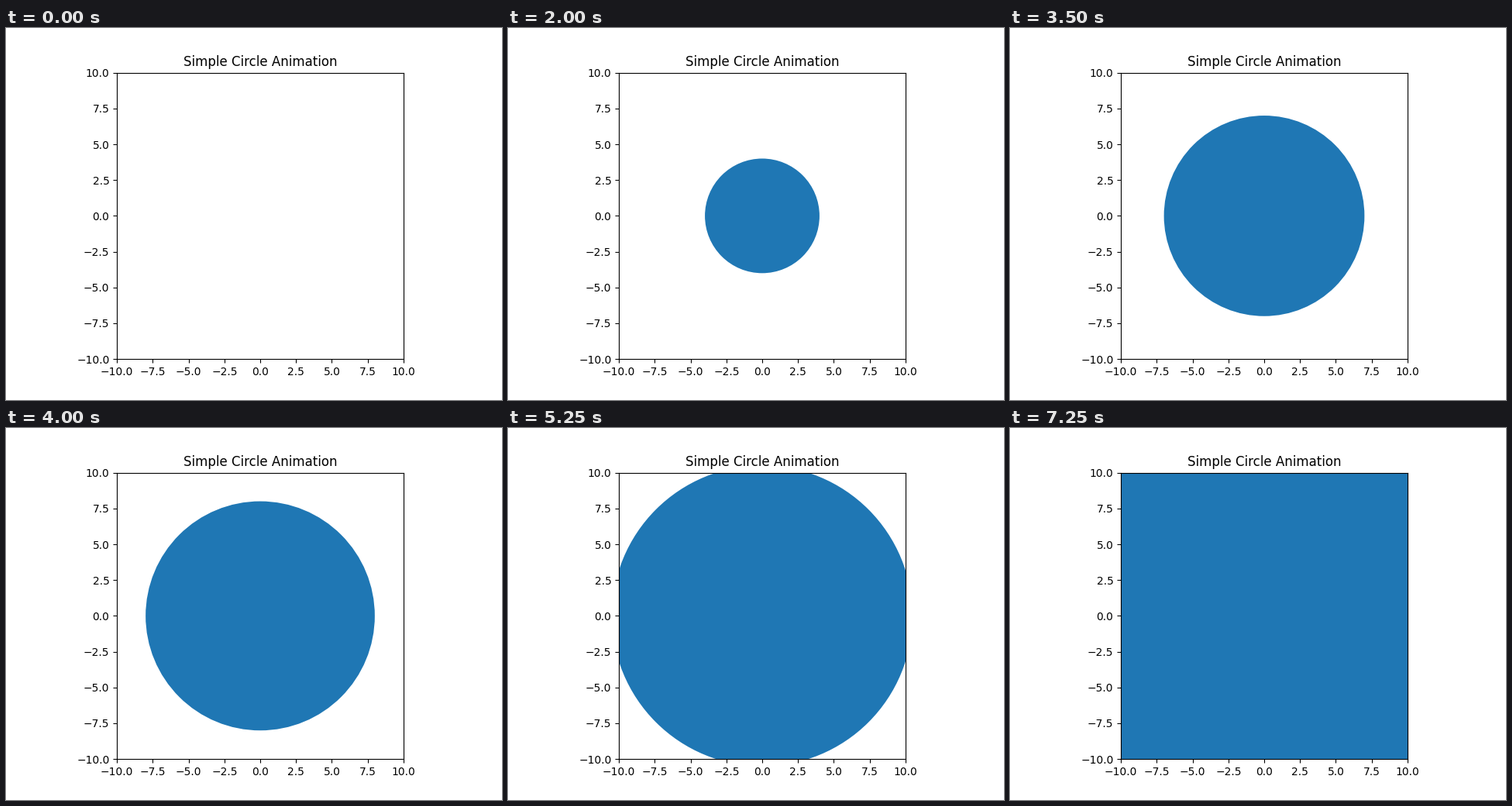
A matplotlib script for the animation above (7.5 s loop, 640x480 px).

```python
import matplotlib.pyplot as plt
from matplotlib.animation import FuncAnimation
from matplotlib.patches import Circle

FRAMES = 30
INTERVAL = 250
GROWTH = 0.5  # radius gained per frame

fig, ax = plt.subplots(figsize=(6.4, 4.8), dpi=100)
ax.set_aspect("equal")
ax.set_xlim(-10, 10)
ax.set_ylim(-10, 10)
ax.set_xticks([-10 + 2.5 * i for i in range(9)])
ax.set_yticks([-10 + 2.5 * i for i in range(9)])
ax.set_title("Simple Circle Animation")

circle = Circle((0, 0), 0, facecolor="#1f77b4", linewidth=0)
ax.add_patch(circle)


def update(frame):
    circle.set_radius(GROWTH * frame)
    circle.set_visible(frame > 0)
    return [circle]


anim = FuncAnimation(fig, update, frames=FRAMES, interval=INTERVAL,
                     init_func=lambda: update(0), repeat=True, blit=False)

plt.show()
```
